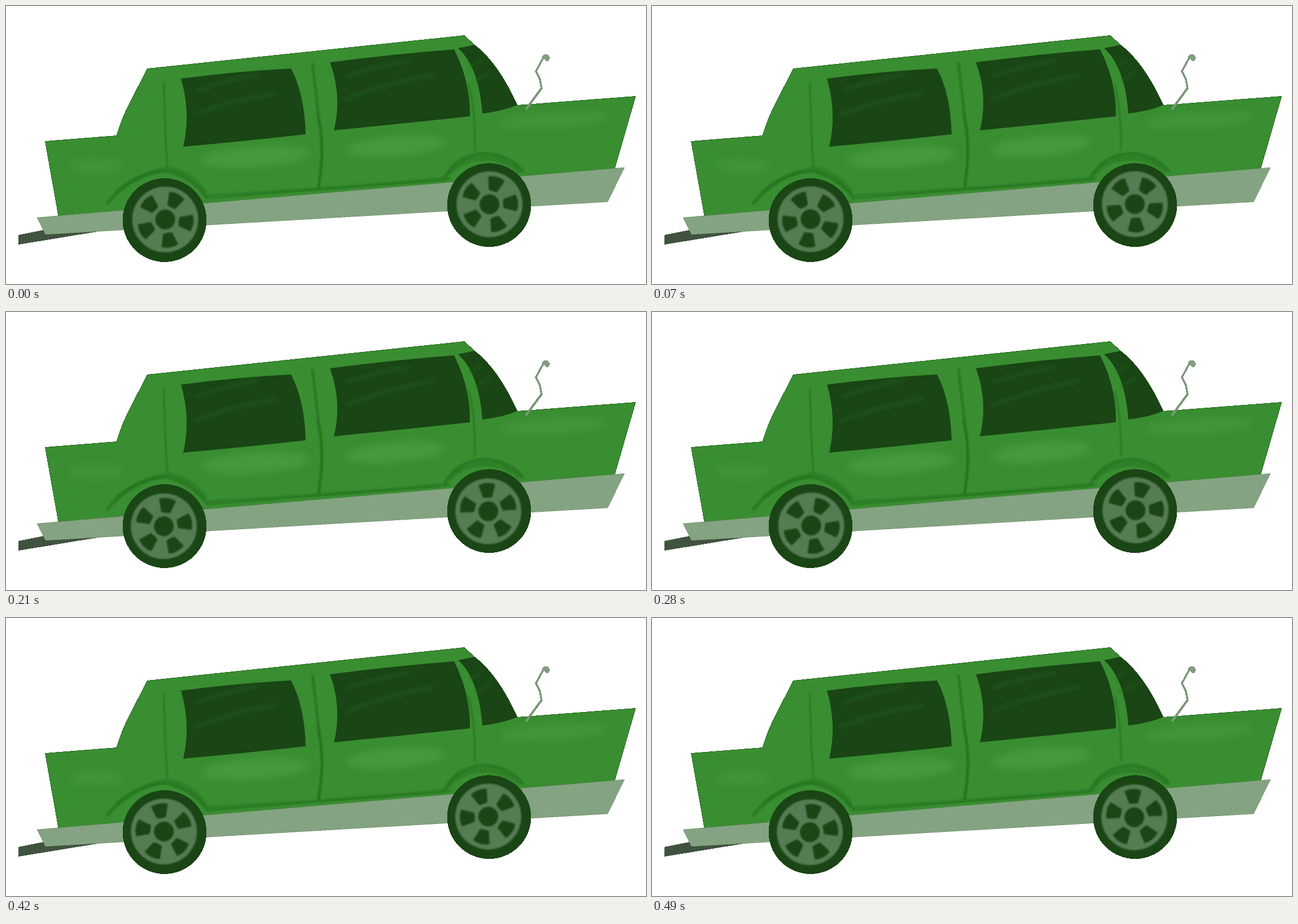
Write an HTML page that moves like this. It is 1134 px wide and 494 px high and loops after 560 ms.

```html
<!DOCTYPE html>
<html lang="en">
<head>
<meta charset="utf-8">
<title>Green car</title>
<style>
  html, body { margin: 0; height: 100%; overflow: hidden; background: #fff; }
  svg { display: block; }
  .hard { shape-rendering: crispEdges; }
  .body { fill: #398e31; }
  .glass, .tyre { fill: #1a4515; }
  .shade { fill: none; stroke: #26751f; stroke-linecap: round; stroke-linejoin: round; }
  .glint { fill: none; stroke: #22591b; stroke-linecap: round; }
  .shine { fill: #46993f; }
</style>
</head>
<body>
<svg width="1134" height="494" viewBox="0 0 1134 494">
  <defs>
    <filter id="soft" x="-20%" y="-20%" width="140%" height="140%"><feGaussianBlur stdDeviation="1.2"/></filter>
    <filter id="haze" filterUnits="userSpaceOnUse" x="0" y="0" width="1134" height="494"><feGaussianBlur stdDeviation="7"/></filter>
    <filter id="smear" filterUnits="userSpaceOnUse" x="0" y="0" width="1134" height="494"><feGaussianBlur stdDeviation="3"/></filter>
    <filter id="brush" filterUnits="userSpaceOnUse" x="0" y="0" width="1134" height="494"><feGaussianBlur stdDeviation="1"/></filter>
    <g id="rim">
      <circle r="58.5" fill="#557b52" filter="url(#soft)"/>
      <g id="holes" class="tyre" filter="url(#soft)"><circle r="17.5"/></g>
    </g>
  </defs>

  <path class="hard" fill="#40533f" d="M22 407 66 398 168 400 22 424Z"/>
  <path class="body hard" stroke="#2b6d25"
    d="M69.5 240.5 196 230.5Q205 199 222 167L250.5 111.5 812 52.5 830 69Q872 101 906 176.5L1115.5 160.5 1078.5 289 93 373Z"/>

  <g class="shine" filter="url(#haze)">
    <ellipse cx="442" cy="268" rx="96" ry="18" transform="rotate(-4 442 268)"/>
    <ellipse cx="690" cy="249" rx="88" ry="18" transform="rotate(-5 690 249)"/>
    <ellipse cx="160" cy="284" rx="50" ry="13" opacity=".6"/>
    <ellipse cx="970" cy="203" rx="96" ry="13" transform="rotate(-4 970 203)" opacity=".8"/>
  </g>

  <g class="shade" filter="url(#brush)">
    <path stroke-width="3" opacity=".7" d="M280 136Q281 220 286 285M820 140Q832 190 831 255"/>
    <path stroke-width="5" opacity=".8" d="M543 103Q549 150 555 208"/>
    <path stroke-width="5" d="M553 195Q563 240 558 290L554 322"/>
    <path stroke-width="6" opacity=".75" d="M180 350Q222 297 282 293Q328 302 357 341M778 304Q800 264 850 262Q892 266 915 293"/>
    <path stroke-width="8" opacity=".55" d="M198 329Q240 297 285 289Q325 293 352 330M786 296Q806 272 850 270Q885 272 908 292"/>
    <path stroke-width="6" opacity=".5" d="M360 337Q570 326 785 306"/>
    <path stroke-width="2.5" opacity=".8" d="M362 342Q480 332 554 326L780 309"/>
  </g>

  <path class="glass" d="M310 129Q408 116 505 111Q529 156 531 228Q424 240 314 250Q328 190 310 129Z"/>
  <path class="glass" d="M574 100Q690 85 794 77Q823 134 822 196Q702 209 581 221Q596 160 574 100Z"/>
  <path class="glass" d="M801 75 830 69Q872 101 906 176Q880 187 844 191Q838 108 801 75Z"/>
  <g class="glint" filter="url(#smear)">
    <path stroke-width="8" opacity=".6" d="M340 150Q385 132 445 122M335 193Q400 168 478 155M606 124Q650 108 712 98M604 166Q660 141 755 123"/>
    <path stroke-width="5" opacity=".8" d="M826 106 842 95M836 130 856 118"/>
  </g>

  <path class="hard" fill="#84a382" stroke="#66835f" stroke-width=".5" d="M55 376 1096 287 1066 348 70 406Z"/>

  <g class="hard" fill="none" stroke="#7c977a" stroke-linejoin="round">
    <path stroke-width="4" d="M921 184 935 165 949 146"/>
    <path stroke-width="3.5" d="M949 147 946 130 939 116 952 92"/>
    <path fill="#829c80" stroke="none" d="M949 91 953 86 960 86 964 92 961 98 957 98 954 94Z"/>
  </g>

  <circle class="tyre hard" cx="281" cy="380.5" r="74.4"/>
  <circle class="tyre hard" cx="856" cy="353.7" r="74.4"/>
  <use class="wheel" href="#rim"/>
  <use class="wheel" href="#rim"/>
</svg>
<script>
const STEP = 70, POSES = 4, HOLES = 5;
const TURN = -54; // four turns bring the five holes back onto each other
const WHEELS = [{ x: 281, y: 380.2, start: 8 }, { x: 855.8, y: 353.4, start: -3 }];

for (let i = 0; i < HOLES; i++)
  document.getElementById('holes').innerHTML +=
    `<path transform="rotate(${(i - 1) * 360 / HOLES})" d="M25 -8 47 -15Q54 0 47 15L25 8Q23 0 25 -8Z"/>`;

const rims = document.querySelectorAll('.wheel');

function draw() {
  const pose = Math.floor(performance.now() / STEP) % POSES;
  WHEELS.forEach(({ x, y, start }, i) =>
    // The rim sits slightly off the axle, so it wobbles as it turns.
    rims[i].setAttribute('transform',
      `translate(${x} ${y}) rotate(${start + TURN * pose}) translate(1 -1)`));
  requestAnimationFrame(draw);
}
draw();
</script>
</body>
</html>
```
